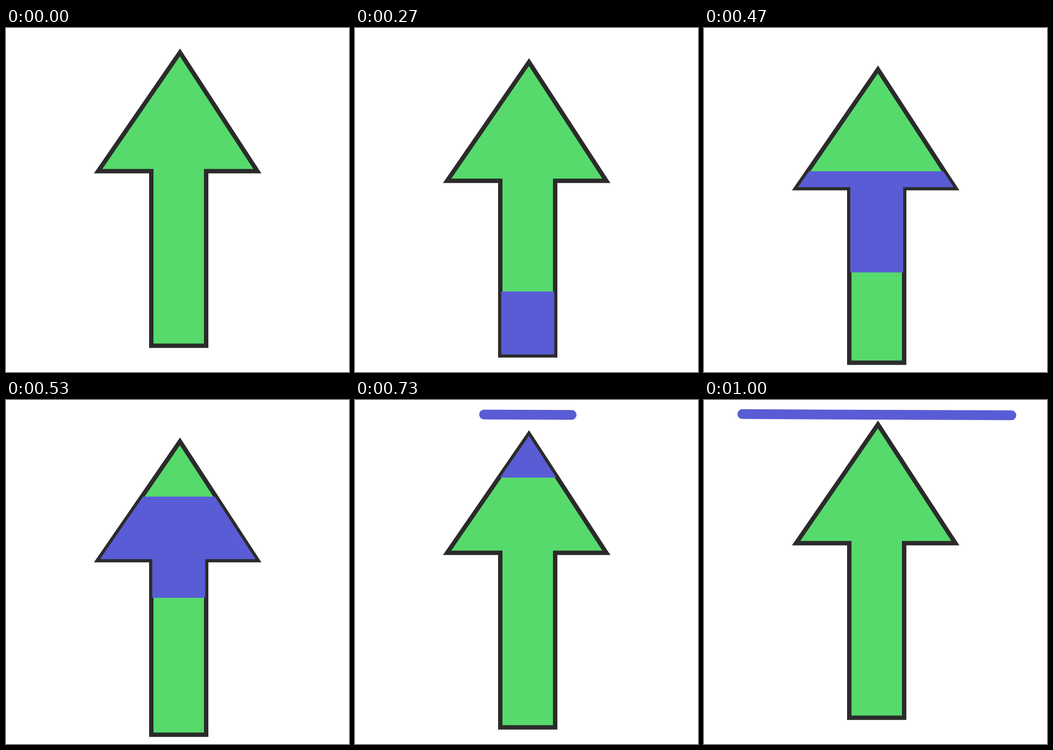
An HTML page for the animation above (1.03 s loop, 700x704 px).

```html
<!DOCTYPE html>
<html lang="en">
<head>
<meta charset="utf-8">
<title>Upload arrow</title>
<style>
  html, body { margin: 0; width: 100%; height: 100%; overflow: hidden; background: #fff; }
  svg { display: block; width: 100%; height: 100%; }
  .outline { fill: none; stroke: #2b2b2b; stroke-miterlimit: 10; }
  #line { stroke: #5a5cd6; stroke-width: 20; stroke-linecap: round; }
</style>
</head>
<body>
<svg viewBox="0 0 700 704">
  <defs>
    <path id="shape" d="M355 50 L513 293 H408.5 V650.3 H296.5 V293 H188 Z"/>
    <clipPath id="inside"><use href="#shape"/></clipPath>
  </defs>
  <g id="arrow">
    <use href="#shape" fill="#56da6c"/>
    <use href="#shape" class="outline" stroke-width="9"/>
    <g clip-path="url(#inside)">
      <rect id="band" x="150" width="400" height="207" fill="#5a5cd6"/>
    </g>
    <use href="#shape" class="outline" stroke-width="4"/>
  </g>
  <line id="line"/>
</svg>
<script>
  const LOOP = 1030, FPS = 30;
  const arrow = document.getElementById('arrow');
  const band = document.getElementById('band');
  const line = document.getElementById('line');

  // Symmetric ease-in-out: cubic-bezier(c, 0, 1 - c, 1)
  function ease(x, c) {
    if (x <= 0) return 0;
    if (x >= 1) return 1;
    let lo = 0, hi = 1;
    for (let i = 0; i < 30; i++) {
      const t = (lo + hi) / 2, r = 1 - t;
      if (3 * c * t * r * r + 3 * (1 - c) * t * t * r + t * t * t < x) lo = t;
      else hi = t;
    }
    return lo * lo * (3 - 2 * lo);
  }

  function draw(ms) {
    // Motion advances in 30 fps steps on a 10 ms clock
    const tick = Math.floor((ms % LOOP) / 10) * 10;
    const n = Math.floor((tick + 5) * FPS / 1000);

    const drop = 35 * ease(1 - Math.abs(n - 15) / 15, 0.5);
    arrow.setAttribute('transform', `translate(0 ${drop})`);
    band.setAttribute('y', 662 - 833 * ease(n / 30, 0.42) - drop);

    const grow = ease((n - 17) / 11.4, 0.674);
    const dx = 274.5 * grow, dy = 1.25 * grow;
    line.setAttribute('visibility', n < 17 ? 'hidden' : 'visible');
    line.setAttribute('x1', 352.8 - dx);
    line.setAttribute('y1', 30.1 - dy);
    line.setAttribute('x2', 352.8 + dx);
    line.setAttribute('y2', 30.1 + dy);
  }

  const start = performance.now();
  function loop() {
    draw(Math.max(0, performance.now() - start));
    requestAnimationFrame(loop);
  }
  loop();
</script>
</body>
</html>
```
